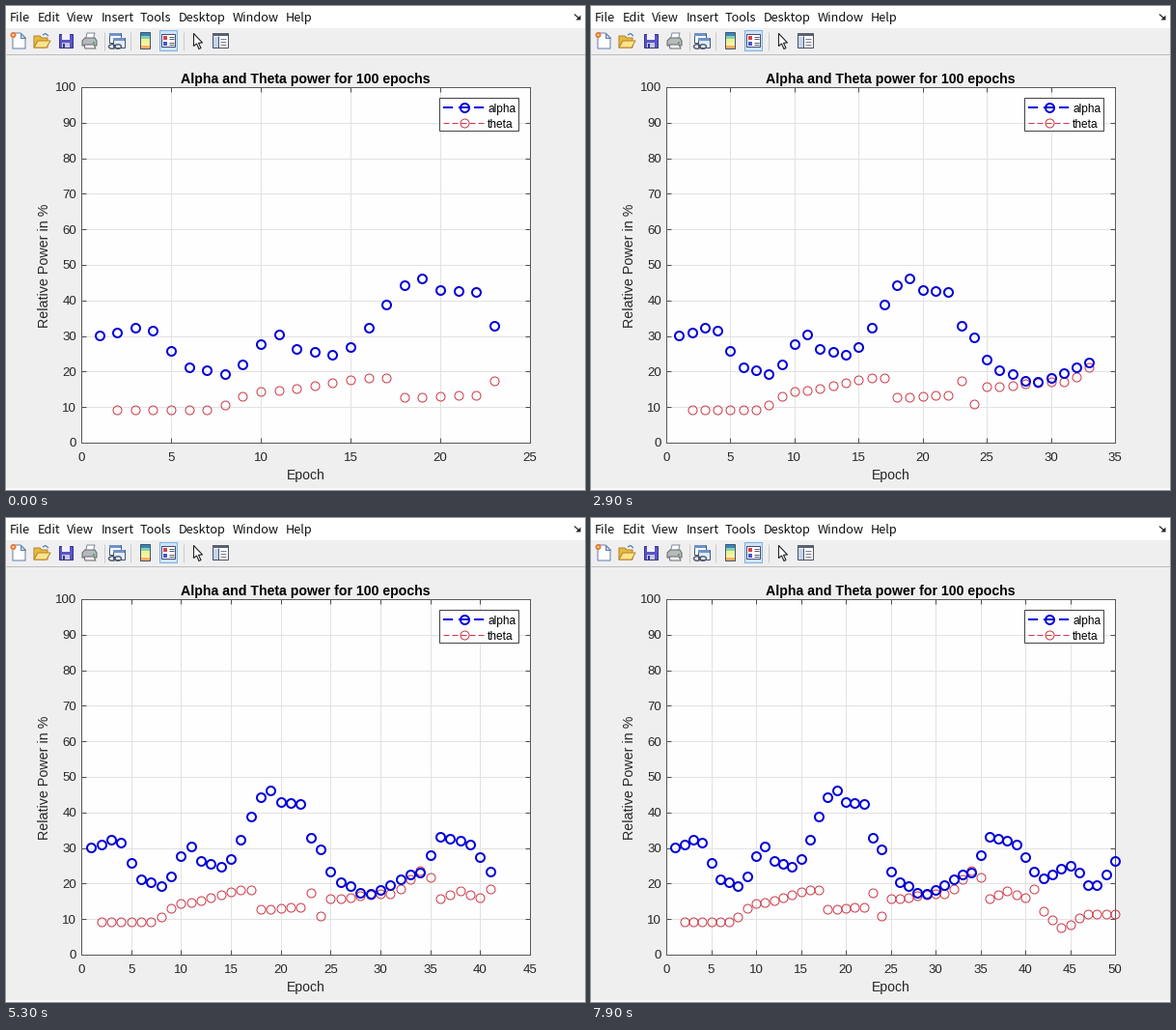
A matplotlib script that plays this animation: 600 by 501 pixels, repeating every 8 s.

```python
import numpy as np
import matplotlib.pyplot as plt
from matplotlib.animation import FuncAnimation
from matplotlib.patches import Circle, Ellipse, Polygon, Rectangle

W, H, DPI = 600, 501, 64
PX = 72 / DPI  # points per pixel
FRAMES, INTERVAL = 80, 100
RATE, PHASE, FIRST = 3.42, 0.75, 23  # epochs per second

BLUE, RED, INK = "#0000d8", "#cc3a48", "#262626"
PANEL = "#f0eff0"


def eased(x, keys):
    """Cosine easing between (x, y) turning points."""
    kx, ky = np.array(keys).T
    i = np.clip(np.searchsorted(kx, x, "right") - 1, 0, len(kx) - 2)
    s = np.clip((x - kx[i]) / (kx[i + 1] - kx[i]), 0, 1)
    return ky[i] + (ky[i + 1] - ky[i]) * (1 - np.cos(np.pi * s)) / 2


EPOCH = np.arange(1, 51)
ALPHA = eased(EPOCH, [
    (1, 30.2), (3.4, 32.6), (6.3, 20.9), (8, 19.2), (11, 30.4), (12.2, 26.1),
    (14, 24.8), (19, 46.3), (20, 42.8), (22, 42.4), (23, 32.8), (26, 20.4),
    (28.5, 17.1), (34, 23), (36, 33.2), (38.3, 32), (42, 21.6), (45, 25.1),
    (47.5, 19), (51, 28)])
THETA = eased(EPOCH, [
    (2, 9.3), (7, 9.2), (10, 14.4), (17, 18.3), (18, 12.7), (22, 13.4),
    (23, 17.4), (24, 11), (25, 15.8), (31, 17.1), (34.5, 23.9), (36, 15.8),
    (38, 17.8), (40, 16), (41, 18.4), (42, 12.1), (44, 7.6), (47, 11.3)])

plt.rcParams["font.family"] = "Liberation Sans"
fig = plt.figure(figsize=(W / DPI, H / DPI), dpi=DPI, facecolor=PANEL)


def pixel_axes(z):
    """Transparent axes over the whole figure, in pixels from the top left."""
    a = fig.add_axes([0, 0, 1, 1], zorder=z)
    a.set(xlim=(0, W), ylim=(H, 0))
    a.axis("off")
    return a


back, over = pixel_axes(0), pixel_axes(2)


def rect(a, x, y, w, h, fc, ec="none", lw=1):
    a.add_patch(Rectangle((x, y), w, h, fc=fc, ec=ec, lw=lw * PX))


def poly(pts, fc, ec="none", lw=1):
    back.add_patch(Polygon(pts, fc=fc, ec=ec, lw=lw * PX, joinstyle="round"))


def line(a, x, y, color, lw=1):
    a.plot(x, y, color=color, lw=lw * PX, solid_capstyle="butt")


def label(a, x, y, s, size, color=INK, **kw):
    a.text(x, y, s, fontsize=size * PX, color=color, **kw)


def draw_menu():
    rect(back, 0, 0, W, 23, "white")
    rect(back, 0, 499, W, 2, "#f8f8f8")
    items = {"File": 4, "Edit": 32.5, "View": 63, "Insert": 99, "Tools": 139,
             "Desktop": 178.5, "Window": 234.5, "Help": 289.5}
    for name, x in items.items():
        label(back, x, 16.3, name, 12.7, "#111111", family="Noto Sans CJK JP")
    line(back, [589, 594], [8.5, 13], "#222222", 1.2)
    poly([(595.5, 14.5), (595.5, 9.5), (590.5, 14.5)], "#222222")


def draw_toolbar():
    line(back, [0, W], [50, 50], "#bcbcbe")
    for x in (102, 129, 184):
        line(back, [x, x], [27, 46], "#cacacc")

    # new page
    poly([(7, 28), (15, 28), (20, 33), (20, 44), (7, 44)], "white", "#5f7fa8")
    poly([(15, 28), (15, 33), (20, 33)], "#c9daf0", "#5f7fa8")
    back.add_patch(Circle((7.5, 30), 3, fc="#e8763a"))
    back.add_patch(Circle((7.5, 30), 1.2, fc="#ffe08a"))

    # open folder
    poly([(29, 43), (29, 31), (35, 31), (37, 33), (43, 33), (43, 43)],
         "#e9b93f", "#b0842a")
    poly([(29, 43), (33, 36), (46, 36), (42, 43)], "#ffe48c", "#b0842a")
    line(back, [38, 41, 44], [30, 28.5, 31], "#4c78b4", 1.2)

    # diskette
    rect(back, 55, 29, 14, 14, "#5a55c4", "#37338f")
    rect(back, 58, 29, 8, 6, "#f2f3fb")
    rect(back, 58, 38, 8, 5, "#c9c9de")
    rect(back, 59, 39, 2, 4, "#37338f")

    # printer
    poly([(82, 36), (84, 28), (92, 28), (90, 36)], "white", "#7c8aa0")
    poly([(79, 36), (82, 33), (92, 33), (94, 36), (94, 41), (79, 41)],
         "#b7b9be", "#66686e")
    poly([(81, 40), (91, 40), (93, 44), (82, 44)], "#f5f5f5", "#66686e")
    rect(back, 90, 37, 2, 1.5, "#4fae55")

    # linked windows
    for x, y, fc in ((107, 28, "white"), (111, 33, "#e4ecf7")):
        rect(back, x, y, 12, 10, fc, "#41597f")
        rect(back, x, y, 12, 3, "#6f93c8")
    for x in (110, 116):
        back.add_patch(Ellipse((x, 42), 7, 4.5, fc="none", ec="#50586a",
                               lw=1.4 * PX))

    # colour bar
    shades = plt.get_cmap("Spectral_r")(np.linspace(0.1, 0.7, 5))
    for i, c in enumerate(shades):
        rect(back, 139, 28 + 3.2 * i, 10, 3.2, c)
    rect(back, 139, 27, 10, 17, "none", "#46546e")

    # legend button, switched on
    rect(back, 159, 25, 18, 21, "#cce4f7", "#7fb2e0")
    rect(back, 161, 29, 14, 13, "white", "#454a72")
    for y, c in ((31, "#d8433f"), (37, "#4457c8")):
        rect(back, 163, y, 4, 4, c)
        for dy in (1, 3):
            line(back, [169, 174], [y + dy, y + dy], "#555a70")

    # pointer
    poly([(194.5, 28.5), (194.5, 41.5), (197.5, 39), (200, 44.5), (202, 43.5),
          (199.5, 38.3), (203.5, 38)], "white", "#222222", 1.1)

    # inspector
    rect(back, 214, 28, 16, 15, "white", "#4d5260")
    rect(back, 214, 28, 16, 3, "#59606f")
    rect(back, 215, 32, 5, 11, "#c5d4ea")
    line(back, [220, 220], [31, 43], "#4d5260")
    for y in (34, 37, 40):
        line(back, [222, 228], [y, y], "#7a8090")


def marks(a, color, lw, z, x=(), y=()):
    return a.plot(x, y, "o", mfc="none", mec=color, ms=9 * PX,
                  mew=lw * PX, zorder=z, clip_on=False)[0]


def draw_legend():
    rect(over, 449, 95, 82, 34, "white", "#444444")
    rows = (("alpha", BLUE, 105, 2, 10, 16), ("theta", RED, 121, 1, 6, 9))
    for name, color, y, lw, dash, step in rows:
        for x in np.arange(453, 495, step):
            line(over, [x, min(x + dash, 495)], [y, y], color, lw)
        marks(over, color, lw, 3, [474.7], [y])
        label(over, 499, y + 4.9, name, 11.9, "black")


def make_plot():
    a = fig.add_axes([78 / W, (H - 452) / H, 465 / W, 368 / H],
                     zorder=1, facecolor="#fefefe")
    a.set(xlim=(0, 25), ylim=(0, 100), yticks=range(0, 101, 10))
    a.set_axisbelow(True)
    a.grid(color="#e2e2e2", lw=PX)
    a.tick_params(direction="in", top=True, right=True, length=4.6 * PX,
                  width=PX, color="#505050", labelcolor=INK,
                  labelsize=13.2 * PX)
    a.tick_params(axis="x", pad=9.8 * PX)
    a.tick_params(axis="y", pad=5 * PX)
    for s in a.spines.values():
        s.set(color="#585858", linewidth=PX)
    return a


draw_menu()
draw_toolbar()
ax = make_plot()
draw_legend()
label(over, 310.5, 80.4, "Alpha and Theta power for 100 epochs", 14.1,
      "black", weight="bold", ha="center")
label(over, 310.8, 490.3, "Epoch", 14, ha="center")
label(over, 46.8, 269, "Relative Power in %", 14.2, rotation=90,
      ha="right", va="center")

theta = marks(ax, RED, 1, 3)
alpha = marks(ax, BLUE, 2, 4)


def update(i):
    n = FIRST + int(RATE * i * INTERVAL / 1000 + PHASE)
    right = 5 * -(-n // 5)
    ax.set_xlim(0, right)
    ax.set_xticks(range(0, right + 1, 5))
    alpha.set_data(EPOCH[:n], ALPHA[:n])
    theta.set_data(EPOCH[1:n], THETA[1:n])
    return alpha, theta


anim = FuncAnimation(fig, update, frames=FRAMES, interval=INTERVAL,
                     repeat=True, blit=False)
plt.show()
```
